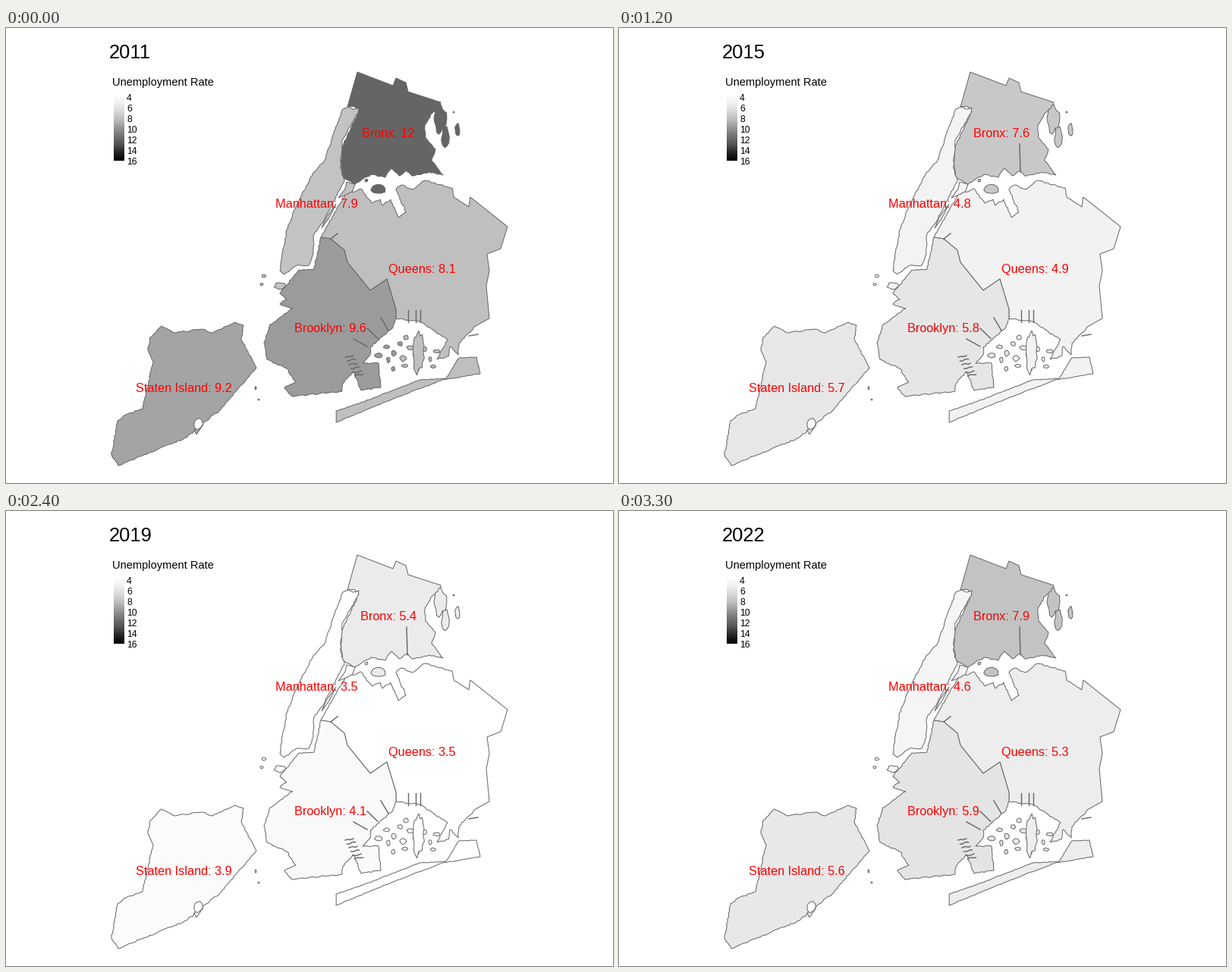
Animation of 800x600 px, one loop 3.6 s. Source, as a matplotlib script:

```python
import math
import random

import numpy as np
import matplotlib.pyplot as plt
from matplotlib.animation import FuncAnimation
from matplotlib.colors import LinearSegmentedColormap
from matplotlib.patches import Polygon

W, H, DPI = 800, 600, 100
PX = 72 / DPI
EDGE = "#666666"
LOW, HIGH = 3.5, 16.05

plt.rcParams["font.family"] = "Liberation Sans"
greys = LinearSegmentedColormap.from_list(
    "greys",
    ["#ffffff", "#f0f0f0", "#d9d9d9", "#bdbdbd", "#969696",
     "#737373", "#525252", "#252525", "#000000"], N=512)

FIRST_YEAR = 2011
RATES = {
    "Bronx": [12, 12.4, 11.7, 9.5, 7.6, 7.1, 6.2, 5.7, 5.4, 16.05, 13.85, 7.9],
    "Manhattan": [7.9, 7.9, 7.5, 6, 4.8, 4.5, 4, 3.7, 3.5, 9.6, 7.8, 4.6],
    "Queens": [8.1, 8.25, 7.8, 6.2, 4.9, 4.5, 4, 3.6, 3.5, 12.5, 9.9, 5.3],
    "Brooklyn": [9.6, 9.8, 9.3, 7.45, 5.8, 5.3, 4.6, 4.2, 4.1, 12.55, 10.4, 5.9],
    "Staten Island": [9.2, 9.3, 8.8, 7.3, 5.7, 5.2, 4.7, 4.2, 3.9, 10.6, 9, 5.6],
}
LABELS = {
    "Bronx": (504, 144), "Manhattan": (409, 237), "Queens": (548.5, 323),
    "Brooklyn": (427.5, 401), "Staten Island": (234.5, 480),
}

rng = random.Random(7)


def coast(pts, amp=0.8, step=3):
    """Split a line through key points into short pieces and shake them."""
    out = []
    for (x0, y0), (x1, y1) in zip(pts, pts[1:]):
        n = max(1, int(math.hypot(x1 - x0, y1 - y0) / step))
        for i in range(n):
            t = i / n
            shake = amp if i else 0
            out.append((x0 + (x1 - x0) * t + rng.uniform(-shake, shake),
                        y0 + (y1 - y0) * t + rng.uniform(-shake, shake)))
    return out + [pts[-1]]


def blob(x, y, rx, ry, n=11):
    """Small irregular island."""
    out = []
    for i in range(n):
        a, r = 2 * math.pi * i / n, rng.uniform(0.75, 1.15)
        out.append((x + rx * r * math.cos(a), y + ry * r * math.sin(a)))
    return out


bronx_north = [(450, 104), (463, 58), (510, 76), (514, 66), (527, 72),
               (530, 84), (573, 98)]
bronx_coast = coast([
    (573, 98), (571, 108), (562, 112), (552, 128), (553, 145), (566, 160),
    (561, 175), (576, 194), (558, 190), (535, 195), (529, 188), (518, 195),
    (508, 185), (500, 197), (481, 193), (460, 206), (443, 196), (441, 160),
    (465, 110), (460, 104), (450, 104)])

manhattan = coast([
    (444, 107), (452, 104), (457, 107), (465, 105), (464, 112), (443, 148),
    (441, 185), (446, 202), (432, 228), (419, 254), (406, 272), (405, 298),
    (399, 313), (383, 313), (367, 325), (361, 320), (370, 266), (384, 231),
    (404, 193), (420, 174), (437, 125), (444, 107)])
wards = [(449, 203), (460, 206), (456, 217), (438, 224), (447, 212)]
roosevelt = [(435, 232), (426, 250), (416, 264), (422, 250)]

# line shared by Queens and Brooklyn
border = [(415, 276), (428, 278), (446, 293), (450, 309), (480, 346),
          (502, 331), (514, 371), (514, 383)]
queens_south = coast([
    (514, 383), (545, 387), (582, 411), (568, 437), (583, 433), (585, 420),
    (596, 431), (597, 416), (619, 393)])
queens_east = [(619, 393), (637, 383), (633, 340), (637, 320), (634, 298),
               (652, 291), (661, 262), (612, 223)]
queens_north = coast([
    (612, 223), (610, 236), (591, 224), (588, 211), (552, 201), (536, 213),
    (521, 207), (514, 213), (527, 243), (517, 250), (507, 226), (496, 234),
    (493, 226), (482, 231), (468, 212), (447, 220), (415, 276)])
brooklyn_bay = coast([
    (514, 383), (510, 395), (480, 421), (480, 431), (470, 442), (491, 442),
    (494, 474), (468, 478), (458, 453), (444, 469), (443, 479)])
brooklyn_west = coast([
    (443, 479), (377, 486), (367, 474), (382, 467), (370, 449), (344, 437),
    (340, 415), (348, 391), (378, 370), (361, 364), (370, 358), (361, 350),
    (386, 319), (406, 318), (415, 276)])
rockaway = coast([
    (435, 505), (471, 493), (545, 464), (580, 462), (597, 435), (620, 434),
    (625, 456), (575, 464), (500, 493), (435, 520), (435, 505)], 0.5)

staten = coast([
    (190, 408), (205, 393), (222, 402), (258, 397), (272, 402), (302, 388),
    (313, 392), (310, 410), (330, 448), (281, 505), (260, 521), (238, 540),
    (148, 577), (139, 563), (147, 518), (158, 510), (180, 502), (194, 440),
    (187, 425), (190, 408)])
harbour = blob(253, 522, 6, 7)
spit = [(248, 530), (260, 523), (251, 536)]

SHAPES = {
    "Bronx": [
        bronx_north + bronx_coast, blob(572, 119, 8, 19, 18),
        blob(579, 143, 5, 14), blob(595, 134, 3, 9), blob(490, 212, 10, 7),
        blob(475, 201, 2, 2), blob(590, 111, 1, 1)],
    "Manhattan": [manhattan, wards, roosevelt, blob(361, 340, 7, 5),
                  blob(340, 327, 3, 2), blob(337, 338, 2, 1.5)],
    "Queens": [border + queens_south + queens_east + queens_north, rockaway],
    "Brooklyn": [border + brooklyn_bay + brooklyn_west],
    "Staten Island": [staten, spit, blob(329, 475, 1, 2), blob(333, 490, 1, 1)],
}

# marsh islands spread over the bay in a spiral
for k in range(18):
    a, r = 2.4 * k, math.sqrt((k + 0.5) / 18)
    x, y = 532 + 42 * r * math.cos(a), 431 + 25 * r * math.sin(a)
    owner = "Brooklyn" if x < 520 else "Queens"
    SHAPES[owner].append(blob(x, y, rng.uniform(2, 5), rng.uniform(2, 4)))
SHAPES["Queens"].append(blob(543, 427, 8, 28, 22))

inlets = [[(528, 153), (529, 190)], [(428, 278), (437, 271)],
          [(610, 406), (622, 404)]]
inlets += [[(x, 388), (x, 372)] for x in (530, 540, 546)]
for k in range(3):
    x, y = 476 + 14 * k, 420 - 10.5 * k
    inlets.append([(x, y), (x - 18 + 4 * k, y - 10 - 3.5 * k)])
for k in range(6):
    x, y = 452 + 2.5 * k, 434 + 5 * k
    inlets.append(coast([(x - 5, y), (x + 6, y - 2)], 1.5))

fig = plt.figure(figsize=(W / DPI, H / DPI), dpi=DPI, facecolor="white")
ax = fig.add_axes([0, 0, 1, 1])
ax.axis("off")


def write(x, y, text, size, **kw):
    return ax.text(x, y, text, fontsize=size * PX, va="baseline", **kw)


def land(pts):
    return ax.add_patch(Polygon(pts, closed=True, facecolor="white",
                                edgecolor=EDGE, linewidth=PX))


areas = {name: [land(p) for p in parts] for name, parts in SHAPES.items()}
land(harbour)
for line in inlets:
    ax.plot(*zip(*line), color=EDGE, lw=1.4 * PX)

year = write(135.5, 40, "", 25.5)
write(140.5, 76, "Unemployment Rate", 14.6)
ax.imshow(np.linspace(0, 1, 256)[:, None], cmap=greys, aspect="auto",
          extent=(142, 156, 175, 88), interpolation="bilinear")
for i in range(7):
    write(159, 96 + 14.05 * i, str(4 + 2 * i), 12.3)
ax.set_xlim(0, W)
ax.set_ylim(H, 0)

labels = {name: write(x, y, "", 16.2, color="red", ha="center", zorder=5)
          for name, (x, y) in LABELS.items()}


def draw(i):
    year.set_text(str(FIRST_YEAR + i))
    for name, rates in RATES.items():
        color = greys((rates[i] - LOW) / (HIGH - LOW))
        for part in areas[name]:
            part.set_facecolor(color)
        labels[name].set_text(f"{name}: {rates[i]:g}")
    return []


anim = FuncAnimation(fig, draw, frames=12, interval=300, repeat=True,
                     repeat_delay=0, init_func=lambda: draw(0))
plt.show()
```
